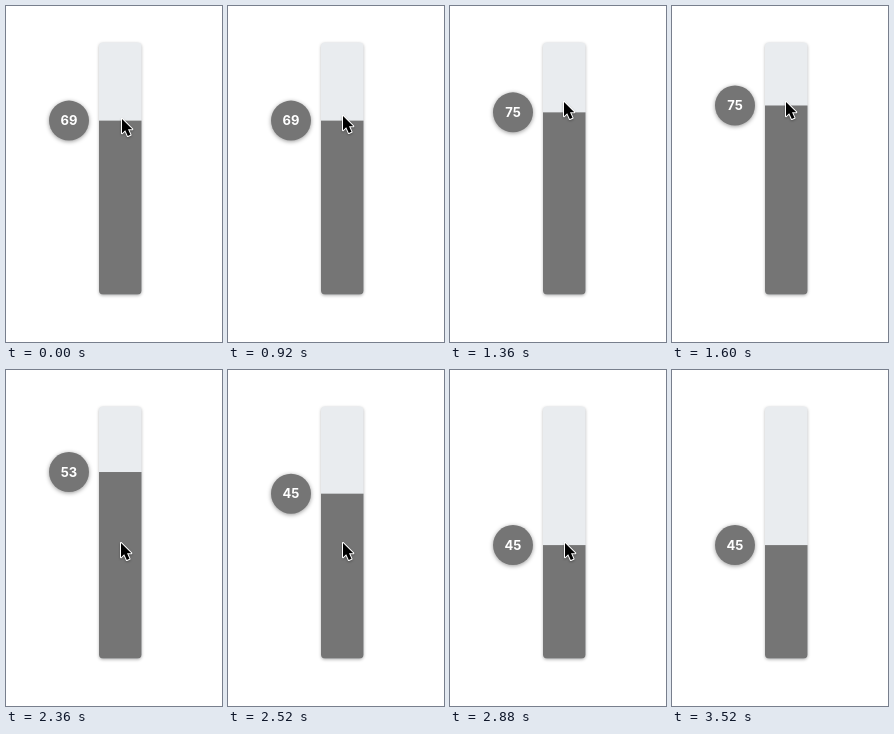
An HTML page that plays this animation: 216x336 px, repeating every 4000 ms.

```html
<!DOCTYPE html>
<html lang="en">
<head>
<meta charset="utf-8">
<title>Vertical slider</title>
<style>
  html, body { margin: 0; height: 100%; overflow: hidden; background: #fff; }
  svg { display: block; width: 100%; height: 100%; }
  text { font: 700 13px Inter, "Liberation Sans", sans-serif; fill: #fff; text-anchor: middle; }
  .bar { filter: drop-shadow(0 1px 1.5px rgba(0, 0, 0, .28)); }
  #bubble circle { filter: drop-shadow(0 1px 2px rgba(0, 0, 0, .4)); }
  #cursor { filter: drop-shadow(0 1px 1px rgba(0, 0, 0, .3)); }
</style>
</head>
<body>
<svg viewBox="0 0 216 336">
  <clipPath id="round"><rect x="93" y="36.5" width="42.5" height="252" rx="4"/></clipPath>
  <g class="bar">
    <g clip-path="url(#round)">
      <rect x="93" y="36" width="43" height="253" fill="#e9ecef"/>
      <rect id="fill" x="93" width="43" height="253" fill="#757575"/>
    </g>
  </g>
  <g id="bubble">
    <circle cx="63" r="20" fill="#757575"/>
    <text id="label" x="63" y="4.7"></text>
  </g>
  <path id="cursor" d="M0 0V14.2L3.2 11.2L5.8 17L8.5 15.8L6 10.2H10.3Z"
    stroke="#fff" stroke-width="2" paint-order="stroke" stroke-linejoin="round"/>
</svg>
<script>
const LOOP = 4000, STEP = 40, GLIDE = 500;
const $ = id => document.getElementById(id);

// Drags of the handle: start and end in ms, values before and after
const drags = [
  { start: 990, end: 1100, from: 69, to: 75 },
  { start: 2270, end: 2380, from: 75, to: 45 }
];

// Pointer path: time, x, y of the tip
const path = [
  [0, 116, 113], [880, 116, 113], [920, 115, 110], [1100, 114, 96],
  [2160, 114, 96], [2280, 114, 116], [2360, 115, 173],
  [3400, 115, 173], [3440, 138, 142], [3480, 189, 68]
];

const clamp = u => Math.min(1, Math.max(0, u));
const mix = (a, b, u) => a + (b - a) * u;

function pointer(t) {
  const i = path.findIndex(p => p[0] > t);
  if (i < 0) return path[path.length - 1].slice(1);
  const [a, b] = [path[i - 1], path[i]], u = (t - a[0]) / (b[0] - a[0]);
  return [mix(a[1], b[1], u), mix(a[2], b[2], u)];
}

function draw(t) {
  let value = 69, level = 69;
  for (const { start, end, from, to } of drags) {
    if (t < start) break;
    const u = clamp((t - start) / (end - start));
    value = mix(from, to, u ** 1.5);
    // The fill creeps during the drag, then glides evenly to the value
    const creep = 0.055 * u ** 2.5;
    level = mix(from, to, mix(creep, 1, clamp((t - end) / GLIDE)));
  }
  const y = 288.5 - level * 2.52;
  $("fill").setAttribute("y", y);
  $("bubble").setAttribute("transform", `translate(0 ${y})`);
  $("label").textContent = Math.round(value);
  $("cursor").setAttribute("transform", `translate(${pointer(t)})`);
  $("cursor").setAttribute("visibility", t < 3520 ? "visible" : "hidden");
}

const began = performance.now();
function tick() {
  const t = (performance.now() - began) % LOOP;
  draw(Math.floor(t / STEP) * STEP);
  requestAnimationFrame(tick);
}
tick();
</script>
</body>
</html>
```
